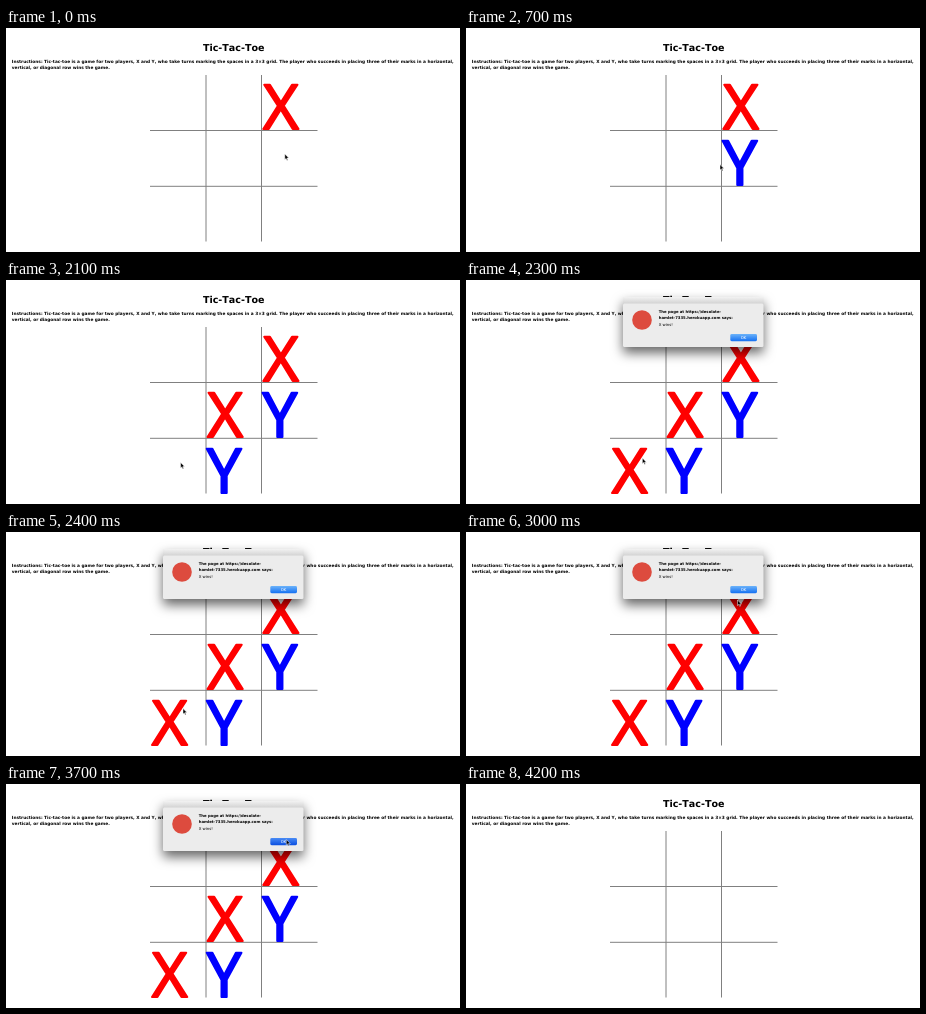
Write an HTML page that moves like this. It is 454 by 224 pixels and loops after 4.6 s.

```html
<!DOCTYPE html>
<html lang="en">
<head>
<meta charset="utf-8">
<title>Tic-Tac-Toe</title>
<style>
html, body { margin: 0; width: 100%; height: 100%; overflow: hidden; background: #fff; }
svg { display: block; width: 454px; height: 224px; }
text { font: bold 4.3px "DejaVu Sans", sans-serif; font-kerning: none; text-rendering: geometricPrecision; }
.title { font-size: 9.55px; }
.mark { font: 62px "Open Sans", "Noto Sans", sans-serif; stroke-width: 2px; stroke-linejoin: round; }
.says { font-size: 3.8px; }
.plain { font-size: 3.9px; font-weight: normal; }
.mid { text-anchor: middle; }
#dialog { filter: drop-shadow(0 6px 6px #0009); }
</style>
</head>
<body>
<svg viewBox="0 0 454 224">
  <defs>
    <linearGradient id="blue" x2="0" y2="1">
      <stop stop-color="#6cb3fa"/>
      <stop offset="1" stop-color="#1470f2"/>
    </linearGradient>
    <linearGradient id="pressed" x2="0" y2="1">
      <stop stop-color="#4a8cf5"/>
      <stop offset="1" stop-color="#0b4fe0"/>
    </linearGradient>
    <linearGradient id="strip" x2="0" y2="1">
      <stop stop-color="#f2f2f2"/>
      <stop offset="1" stop-color="#cccccc"/>
    </linearGradient>
  </defs>
  <text class="title mid" x="227.7" y="22.8">Tic-Tac-Toe</text>
  <text x="5.8" y="35.1">Instructions: Tic-tac-toe is a game for two players, X and Y, who take turns marking the spaces in a 3×3 grid. The player who succeeds in placing three of their marks in a horizontal,</text>
  <text x="5.8" y="41.2">vertical, or diagonal row wins the game.</text>
  <path d="M200 47V213.5M255.5 47V213.5M144 102.5H311.5M144 158.3H311.5" stroke="#808080"/>
  <g id="marks"></g>
  <g id="dialog">
    <rect x="157" y="17" width="140.5" height="8" fill="url(#strip)"/>
    <rect x="157" y="23.5" width="140.5" height="43.5" rx="1.5" fill="#ececec"/>
    <circle cx="176" cy="40" r="9.8" fill="#dd4b3e"/>
    <text class="says" x="192.7" y="33.1">The page at https://desolate-</text>
    <text class="says" x="192.7" y="39">hamlet-7335.herokuapp.com says:</text>
    <text class="plain" x="192.7" y="46.4">X wins!</text>
    <rect id="button" x="264.3" y="54" width="26.7" height="7.2" rx="1.4"/>
    <text class="plain mid" x="277.6" y="59.1" fill="#fff">OK</text>
  </g>
  <path id="cursor" d="M0 0V5.6L1.3 4.4L2.2 6.4L3.1 6L2.2 4.1H4Z" stroke="#fff" stroke-width=".5"/>
</svg>
<script>
const LOOP = 4600, STEP = 100, PRESS = 3600, CLEAR = 3800;
const $ = id => document.getElementById(id);

// letter, column, row, time of appearance
const moves = [["X", 2, 0, 0], ["Y", 2, 1, 400], ["X", 1, 1, 1200], ["Y", 1, 2, 1700], ["X", 0, 2, 2200]];

// time, x, y of the pointer tip
const path = [
  [0, 278.8, 126], [200, 280, 128], [400, 280, 128], [1000, 228, 145], [1300, 228, 145],
  [1500, 221, 172], [1700, 221, 172], [2100, 174.6, 182.5], [2400, 177, 176.5],
  [3000, 271.5, 68], [3500, 280.3, 55.5], [LOOP, 280.3, 55.5]
];

const marks = moves.map(([letter, col, row]) => {
  const el = document.createElementNS("http://www.w3.org/2000/svg", "text");
  el.textContent = letter;
  el.setAttribute("class", "mark mid");
  el.setAttribute("x", 163.6 + col * 55.6 - (letter === "Y" ? 1 : 0));
  el.setAttribute("y", 101.2 + row * 55.7);
  el.style.fill = el.style.stroke = letter === "X" ? "#f00" : "#00f";
  return $("marks").appendChild(el);
});

const show = (el, on) => el.style.display = on ? "" : "none";

function pointer(t) {
  const i = path.findIndex(p => p[0] > t);
  const [t0, x0, y0] = path[i - 1], [t1, x1, y1] = path[i];
  const u = (t - t0) / (t1 - t0), e = u * u * (3 - 2 * u);
  return [x0 + (x1 - x0) * e, y0 + (y1 - y0) * e];
}

function draw(now) {
  const t = Math.floor(now % LOOP / STEP) * STEP;
  moves.forEach((m, i) => show(marks[i], t >= m[3] && t < CLEAR));
  show($("dialog"), t >= 2300 && t < CLEAR);
  $("button").setAttribute("fill", t < PRESS ? "url(#blue)" : "url(#pressed)");
  show($("cursor"), t < 3900);
  $("cursor").setAttribute("transform", `translate(${pointer(t)})`);
}

let start;
function tick(now) {
  start ??= now;
  draw(now - start);
  requestAnimationFrame(tick);
}
draw(0);
requestAnimationFrame(tick);
</script>
</body>
</html>
```
